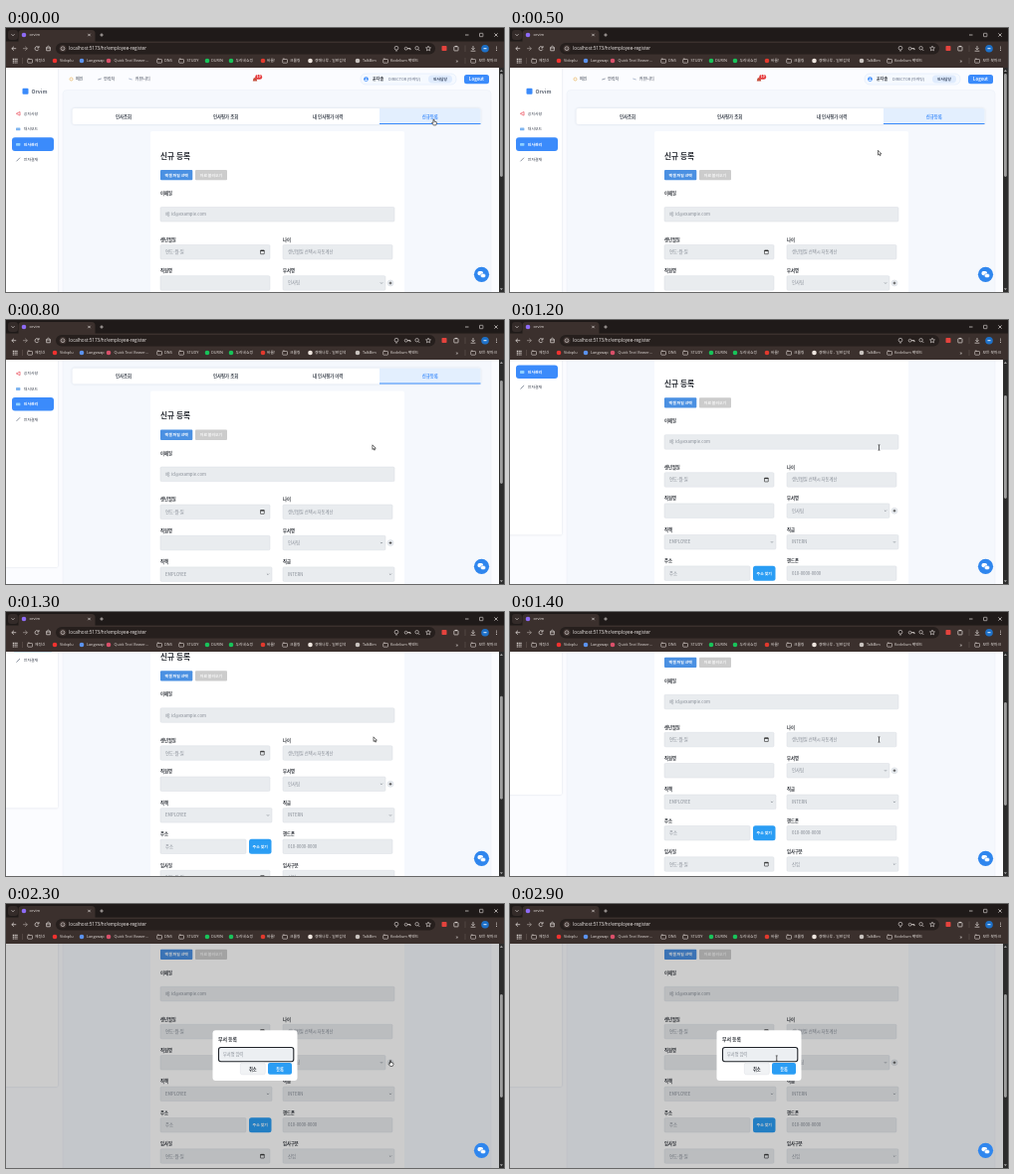
Recreate the animation shown at these times as an HTML page with a canvas. Size 500x266 px, loop 3000 ms.

```html
<!DOCTYPE html>
<html lang="ko">
<head>
<meta charset="utf-8">
<title>Employee register</title>
<style>
html, body { margin: 0; width: 100%; height: 100%; overflow: hidden; background: #fff; }
canvas { display: block; width: 500px; height: 266px; }
</style>
</head>
<body>
<canvas id="stage"></canvas>
<script>
const W = 500, H = 266, LOOP = 3000, STEP = 100, TOP = 40;
const canvas = document.getElementById('stage');
const ctx = canvas.getContext('2d');
const ratio = window.devicePixelRatio || 1;
canvas.width = W * ratio;
canvas.height = H * ratio;

const SANS = '"Noto Sans CJK KR", "Noto Sans CJK", sans-serif';
const UI = '"Open Sans", "Noto Sans CJK KR", "Noto Sans CJK", sans-serif';
const BLUE = '#3b8bfb', SKY = '#2a9df4', INK = '#2b2f36', MUTED = '#858b94', FIELD = '#e9ecef';

function shift(x, y) {
  ctx.transform(1, 0, 0, 1, x, y);
}
function box(x, y, w, h, fill, r = 0, stroke, lw = 0.5) {
  ctx.beginPath();
  ctx.roundRect(x, y, w, h, r);
  if (fill) { ctx.fillStyle = fill; ctx.fill(); }
  if (stroke) { ctx.strokeStyle = stroke; ctx.lineWidth = lw; ctx.stroke(); }
}
function disc(x, y, r, fill, stroke, lw = 0.6) {
  ctx.beginPath();
  ctx.arc(x, y, r, 0, Math.PI * 2);
  if (fill) { ctx.fillStyle = fill; ctx.fill(); }
  if (stroke) { ctx.strokeStyle = stroke; ctx.lineWidth = lw; ctx.stroke(); }
}
function line(points, color, lw = 0.7) {
  ctx.beginPath();
  points.forEach(([x, y]) => ctx.lineTo(x, y));
  ctx.strokeStyle = color;
  ctx.lineWidth = lw;
  ctx.stroke();
}
function text(s, x, y, size, color, { bold = false, align = 'left', font = SANS } = {}) {
  ctx.font = `${bold ? 'bold ' : ''}${size}px ${font}`;
  ctx.fillStyle = color;
  ctx.textAlign = align;
  ctx.fillText(s, x, y + size * 0.36);
}
const centered = (s, x, y, size, color, bold = true) => text(s, x, y, size, color, { bold, align: 'center' });
function chevron(x, y, s, color, lw) {
  line([[x - s, y - s / 2], [x, y + s / 2], [x + s, y - s / 2]], color, lw);
}
function cross(x, y, s, color) {
  line([[x - s, y - s], [x + s, y + s]], color);
  line([[x - s, y + s], [x + s, y - s]], color);
}
function plus(x, y, s, color, lw) {
  line([[x - s, y], [x + s, y]], color, lw);
  line([[x, y - s], [x, y + s]], color, lw);
}
function folder(x, y) {
  box(x - 2.3, y - 1.5, 4.8, 3.7, null, 0.6, '#ddd6d2', 0.6);
  line([[x - 2.2, y - 2], [x - 0.3, y - 2]], '#ddd6d2', 0.6);
}

// Browser frame
const bookmarks = [
  [24, 29, '제정신'], [49, 54, 'Vidoplu', '#f0322f'], [76, 81, 'Langswap', '#5b93ee'],
  [103, 108.5, 'Quick Text Viewer...', '#d9506a'], [154, 159, 'DNS'], [176, 181.5, 'STUDY'],
  [202, 206, 'DURIN', '#18c45a'], [226, 230.5, '두리네쇼핑', '#18c45a'], [258, 262, '바룸!', '#e2392d'],
  [280, 285, '크롤링'], [305.5, 310, '경매나루 - 일반검색', '#efe6e0'], [353, 358, 'TalkBim', '#c9c3bf'],
  [381, 386, 'Kodelium 백엔드'], [469, 474.5, '모든 북마크']
];
function drawBrowser() {
  const light = '#e6e0dd', ui = { font: UI };
  box(0, 0, W, 14, '#1f1a19');
  box(0, 13.5, W, TOP - 13.5, '#3b302d');
  box(2, 2, 10, 10, '#342b29', 3);
  chevron(7, 7, 1.5, light);
  box(12.5, 2, 77, 14, '#3b302d', [3.5, 3.5, 0, 0]);
  disc(18, 7, 2.3, '#8e6bf5');
  text('orvim', 23.5, 7, 4, light, ui);
  cross(83.5, 7, 1.2, light);
  plus(96, 7, 1.7, light);
  line([[461, 7], [464.5, 7]], light);
  box(475.5, 5.3, 3.4, 3.4, null, 0.4, light, 0.6);
  cross(492, 7, 1.6, light);

  const y = 20.7;
  line([[10.2, y], [5.8, y]], light); line([[8, y - 2], [5.8, y], [8, y + 2]], light);
  line([[17, y], [21.4, y]], '#a59c98'); line([[19.2, y - 2], [21.4, y], [19.2, y + 2]], '#a59c98');
  ctx.beginPath(); ctx.arc(31, y, 2, 0.4, 5.6);
  ctx.strokeStyle = light; ctx.lineWidth = 0.7; ctx.stroke();
  line([[33, 18], [33, 20], [31.3, 20]], light);
  line([[40, 20.2], [42.5, 18.2], [45, 20.2]], light); box(40.7, 20, 3.6, 2.8, null, 0, light, 0.7);
  box(50, 15, 381, 11.4, '#261f1d', 5.7);
  disc(57, y, 3.6, '#3b302d');
  disc(57, y, 1.9, null, light);
  line([[57, y - 0.3], [57, y + 1]], light, 0.5);
  text('localhost:5173/hr/employee-register', 63.2, y, 4.6, '#f1ecea', ui);
  disc(392, y - 0.5, 1.9, null, light); line([[392, y + 1.3], [392, y + 3]], light);
  disc(401.6, y, 1.4, null, light); line([[403, y], [406, y], [406, y + 1.4]], light, 0.9);
  disc(412.6, y - 0.5, 1.7, null, light); line([[413.8, y + 0.7], [415.3, y + 2.2]], light);
  ctx.beginPath();
  for (let i = 0; i < 10; i++) {
    const a = i * Math.PI / 5 - Math.PI / 2, r = i % 2 ? 1.2 : 2.6;
    ctx.lineTo(424 + r * Math.cos(a), y + r * Math.sin(a));
  }
  ctx.closePath(); ctx.strokeStyle = light; ctx.lineWidth = 0.6; ctx.stroke();
  box(437.5, 18, 5, 5, '#e4433d', 0.8);
  box(449.8, 18.7, 4.2, 4.2, null, 0.6, light, 0.7); disc(452, 18.5, 0.8, light);
  line([[461, 17.5], [461, 24]], '#6b5d58', 0.5);
  line([[469, 18], [469, 21.6]], light); chevron(469, 21, 1.6, light); line([[466.6, 23.2], [471.4, 23.2]], light);
  disc(481, y, 3.8, '#1d70c8');
  line([[479.5, y], [482.5, y]], '#fff', 0.9);
  for (let i = -1; i < 2; i++) disc(492.5, y + i * 1.8, 0.5, light);

  for (let i = 0; i < 9; i++) box(6.8 + i % 3 * 1.8, 30.8 + Math.floor(i / 3) * 1.8, 1.1, 1.1, light);
  line([[16.5, 30], [16.5, 36]], '#6b5d58', 0.5);
  for (const [ix, tx, label, color] of bookmarks) {
    if (color) disc(ix, 33, 2.3, color); else folder(ix, 33);
    text(label, tx, 33, 3.8, light, ui);
  }
  text('»', 451.5, 32.7, 5, light, ui);
  line([[461, 30], [461, 36]], '#6b5d58', 0.5);
}

// Page, in unscrolled coordinates
const fields = [
  { label: '이메일', x: 155, y: 180.5, w: 235, hint: '예: id@example.com', gap: 14 },
  { label: '생년월일', x: 155, y: 218.5, w: 110, hint: '연도-월-일', date: true },
  { label: '나이', x: 278, y: 218.5, w: 110, hint: '생년월일 선택시 자동계산' },
  { label: '직원명', x: 155, y: 249.7, w: 110, hint: '' },
  { label: '부서명', x: 278, y: 249.7, w: 103, hint: '인사팀', select: true },
  { label: '직책', x: 155, y: 281.3, w: 112, hint: 'EMPLOYEE', select: true },
  { label: '직급', x: 278, y: 281.3, w: 112, hint: 'INTERN', select: true },
  { label: '주소', x: 155, y: 312.7, w: 86, hint: '주소' },
  { label: '핸드폰', x: 278, y: 312.7, w: 110, hint: '010-0000-0000' },
  { label: '입사일', x: 155, y: 344, w: 110, hint: '연도-월-일', date: true },
  { label: '입사구분', x: 278, y: 344, w: 112, hint: '신입', select: true }
];
const FIELD_H = 14.5;

function drawField({ label, x, y, w, hint, date, select, gap = 5.2 }) {
  const mid = y + FIELD_H / 2;
  text(label, x, y - gap, 4.3, INK, { bold: true });
  box(x, y, w, FIELD_H, FIELD, 1.2, '#d9dde2', 0.5);
  text(hint, x + 5, mid, 4.3, MUTED);
  if (select) chevron(x + w - 4, mid, 1.1, '#6f767f', 0.6);
  if (date) {
    box(x + w - 9.5, mid - 1.8, 3.8, 3.8, null, 0.3, '#222', 0.6);
    line([[x + w - 9.5, mid - 1.3], [x + w - 5.7, mid - 1.3]], '#222', 1);
  }
}

function drawSidebar() {
  ctx.save();
  ctx.shadowColor = 'rgba(40,60,100,.18)';
  ctx.shadowBlur = 2 * ratio;
  box(-4, 36, 56, 245.3, '#fff', 1);
  ctx.restore();
  box(16.5, 60.8, 6, 6, BLUE, 1);
  text('Orvim', 25.5, 64, 5.2, '#5d6573', { bold: true });
  box(6, 110.3, 42, 13.6, BLUE, 3);
  [['공지사항', 86.3, '#f0717c'], ['대시보드', 101.8, '#7fb5ef'], ['인사관리', 117.2, '#8fd0ff'], ['전자결재', 132.5, '#8b93a1']]
    .forEach(([label, y, color], i) => {
      if (i === 0) line([[10.3, y], [14, y - 1.8], [14, y + 1.8], [10.3, y]], color, 0.9);
      else if (i === 3) line([[10.5, y + 1.8], [14, y - 1.8]], color, 1);
      else box(10, y - 1.3, 4.4, 2.8, color, 0.6);
      text(label, 17.8, y, 3.9, i === 2 ? '#fff' : '#3c4350', { bold: i === 2 });
    });
}

function drawHeader() {
  const y = 51.5;
  [['메인', 65.5, 70, '#e8b25a'], ['연락처', 94, 98, '#8d96a5'], ['커뮤니티', 125, 129.7, '#a9b6cb']].forEach(([label, ix, tx, color], i) => {
    if (i === 0) disc(ix, y, 1.5, null, color, 0.7);
    else line([[ix - 1.7, y + 1.5 - i], [ix + 1.7, y - 1.5 + i]], color, 0.9);
    text(label, tx, y, 4.1, '#3c4350');
  });
  ctx.beginPath(); ctx.arc(250, y + 0.3, 1.8, Math.PI, 0); ctx.lineTo(252.2, y + 2); ctx.lineTo(247.8, y + 2);
  ctx.fillStyle = '#c6503d'; ctx.fill();
  box(250.2, 47, 7, 4.8, '#e5383b', 2.4);
  centered('10', 253.7, 49.3, 3.2, '#fff');
  box(356, 46, 96, 11, '#f5f9ff', 5, '#dbe7f8');
  disc(361.5, y, 2.3, BLUE); disc(361.5, y - 0.6, 0.7, '#fff'); box(360.4, y + 0.4, 2.2, 1, '#fff', 0.5);
  text('윤다솔', 368, y, 4.1, INK, { bold: true });
  text('DIRECTOR (마케팅)', 384, y, 3.8, '#667084');
  box(424, 47.5, 24, 8, '#dfebfd', 4);
  centered('인사담당', 436, y, 3.8, '#34445f');
  box(460, 47, 25, 9.2, BLUE, 2.5);
  centered('Logout', 472.5, y, 4.3, '#fff');
}

function drawPage() {
  box(0, TOP, 495, 420, '#fbfcff');
  drawSidebar();
  box(57, 62.5, 430, 420, '#f5f8fd', 4, '#e9eef6', 0.5);
  drawHeader();

  ctx.save();
  ctx.shadowColor = 'rgba(40,60,100,.16)';
  ctx.shadowBlur = 2.5 * ratio;
  box(66.5, 81, 410, 16, '#fff', 2);
  ctx.restore();
  box(375, 81, 101.5, 16, '#e3effe', [0, 2, 2, 0]);
  box(375, 96, 101.5, 1, BLUE);
  ['인사조회', '인사평가 조회', '내 인사평가 이력', '신규등록'].forEach((label, i) =>
    centered(label, 118 + i * 102.6, 89, 4.4, i === 3 ? BLUE : '#3a414c'));

  box(145, 104, 255, 380, '#fff', 2);
  text('신규 등록', 155, 129, 7.7, INK, { bold: true });
  box(155, 143, 32.3, 10.3, '#4a90e2', 1);
  centered('엑셀 파일 선택', 171.2, 148.2, 3.9, '#fff');
  box(190, 143, 32, 10.3, '#cccccc', 1);
  centered('자료 불러오기', 206, 148.2, 3.9, '#f6f6f6');
  fields.forEach(drawField);
  disc(386, 257, 3, '#eceff3', '#cfd4da', 0.5);
  plus(386, 257, 1.4, '#333', 0.8);
  box(244, 312.5, 22.5, 15, SKY, 2.5);
  centered('주소 찾기', 255.2, 320, 3.9, '#fff');
}

function drawModal() {
  box(207.5, 127.3, 85, 50.7, '#fff', 3);
  text('부서 등록', 213, 136.5, 4.9, INK, { bold: true });
  box(213.5, 144.5, 75.3, 14.2, '#eceff2', 2.2, '#20242a', 1.1);
  text('부서명 입력', 218, 151.6, 4.2, MUTED);
  box(235.3, 160, 25, 11.8, '#f1f3f5', 2, '#dde1e5');
  centered('취소', 247.8, 166, 4.2, INK);
  box(263, 160, 24, 11.8, SKY, 2);
  centered('등록', 275, 166, 4.2, '#fff');
}

function drawChat() {
  disc(477.5, 248.3, 7.6, '#2f86ee');
  box(473.5, 245, 5.5, 4.2, '#fff', 1.8);
  box(476.4, 247.6, 5.2, 4, '#fff', 1.8, '#2f86ee', 0.5);
}

function drawScrollbar(scroll) {
  const arrow = (y, dir) => {
    ctx.beginPath();
    ctx.moveTo(495.9, y + dir); ctx.lineTo(498.9, y + dir); ctx.lineTo(497.4, y - dir);
    ctx.fillStyle = '#a5a5a5'; ctx.fill();
  };
  box(495, TOP, 5, H - TOP, '#2c2c2c');
  box(496, 46 + scroll * 0.462, 2.8, 104, '#9f9f9f', 1.4);
  arrow(43, 1);
  arrow(263.3, -1);
}

// Motion
const clamp = v => Math.max(0, Math.min(1, v));
const ease = p => p * p * (3 - 2 * p);
const wheelTicks = [[510, 240], [880, 260], [1200, 180]];
const scrollAt = t => wheelTicks.reduce((sum, [start, span]) => sum + 32.4 * ease(clamp((t - start) / span)), 0);

const path = [
  [0, 430, 95], [100, 429, 96], [500, 371, 126], [600, 369, 128.5], [1200, 370.5, 128.5],
  [1500, 370.5, 128.5], [2000, 387, 161], [2200, 388, 162], [2300, 386.5, 160.5], [2400, 384, 160], [2800, 268, 155.5], [3000, 267.5, 155.5]
];
function pointerAt(t) {
  const i = path.findIndex(key => key[0] > t);
  const [t0, x0, y0] = path[i - 1], [t1, x1, y1] = path[i];
  const p = ease((t - t0) / (t1 - t0));
  return [x0 + (x1 - x0) * p, y0 + (y1 - y0) * p];
}
const inside = (px, py, x, y, w, h) => px >= x && px <= x + w && py >= y && py <= y + h;
function pointerKind(x, y, scroll, modal, t) {
  if (modal) {
    if (t < 2400) return 'hand';
    return inside(x, y, 213, 144, 76, 15) ? 'beam' : 'arrow';
  }
  const py = y + scroll;
  if (inside(x, py, 66, 81, 410, 16) || Math.hypot(x - 386, py - 257) < 4) return 'hand';
  return fields.some(f => !f.select && inside(x, py, f.x, f.y, f.w, FIELD_H)) ? 'beam' : 'arrow';
}
function drawPointer(x, y, kind) {
  ctx.save();
  shift(x, y);
  if (kind === 'beam') {
    line([[0, -2.5], [0, 2.5]], '#222', 0.7);
    line([[-1, -2.7], [1, -2.7]], '#222', 0.6);
    line([[-1, 2.7], [1, 2.7]], '#222', 0.6);
  } else {
    const outline = kind === 'hand'
      ? [[-1, -2.8], [0, -2.8], [0, -0.8], [2.2, -0.3], [2.5, 1], [1.7, 2.9], [-0.8, 2.9], [-2.4, 0.6], [-1.8, 0], [-1, 0.7]]
      : [[-1.5, -2.7], [-1.5, 2], [-0.4, 1], [0.4, 2.7], [1.1, 2.3], [0.4, 0.8], [1.9, 0.7]];
    ctx.beginPath();
    outline.forEach(([px, py]) => ctx.lineTo(px, py));
    ctx.closePath();
    ctx.fillStyle = '#fff'; ctx.fill();
    ctx.strokeStyle = '#111'; ctx.lineWidth = 0.6; ctx.lineJoin = 'round'; ctx.stroke();
  }
  ctx.restore();
}

function draw(now) {
  const t = Math.floor(now % LOOP / STEP) * STEP;
  const scroll = scrollAt(t), modal = t >= 2300;
  ctx.setTransform(ratio, 0, 0, ratio, 0, 0);
  ctx.save();
  ctx.beginPath();
  ctx.rect(0, TOP, 495, H - TOP);
  ctx.clip();
  shift(0, -scroll);
  drawPage();
  ctx.restore();
  if (modal) {
    box(0, TOP, 495, H - TOP, 'rgba(0,0,0,.2)');
    drawModal();
  }
  drawChat();
  drawScrollbar(scroll);
  drawBrowser();
  const [x, y] = pointerAt(t);
  drawPointer(x, y, pointerKind(x, y, scroll, modal, t));
}

const start = performance.now();
function tick() {
  draw(performance.now() - start);
  requestAnimationFrame(tick);
}
tick();
</script>
</body>
</html>
```
